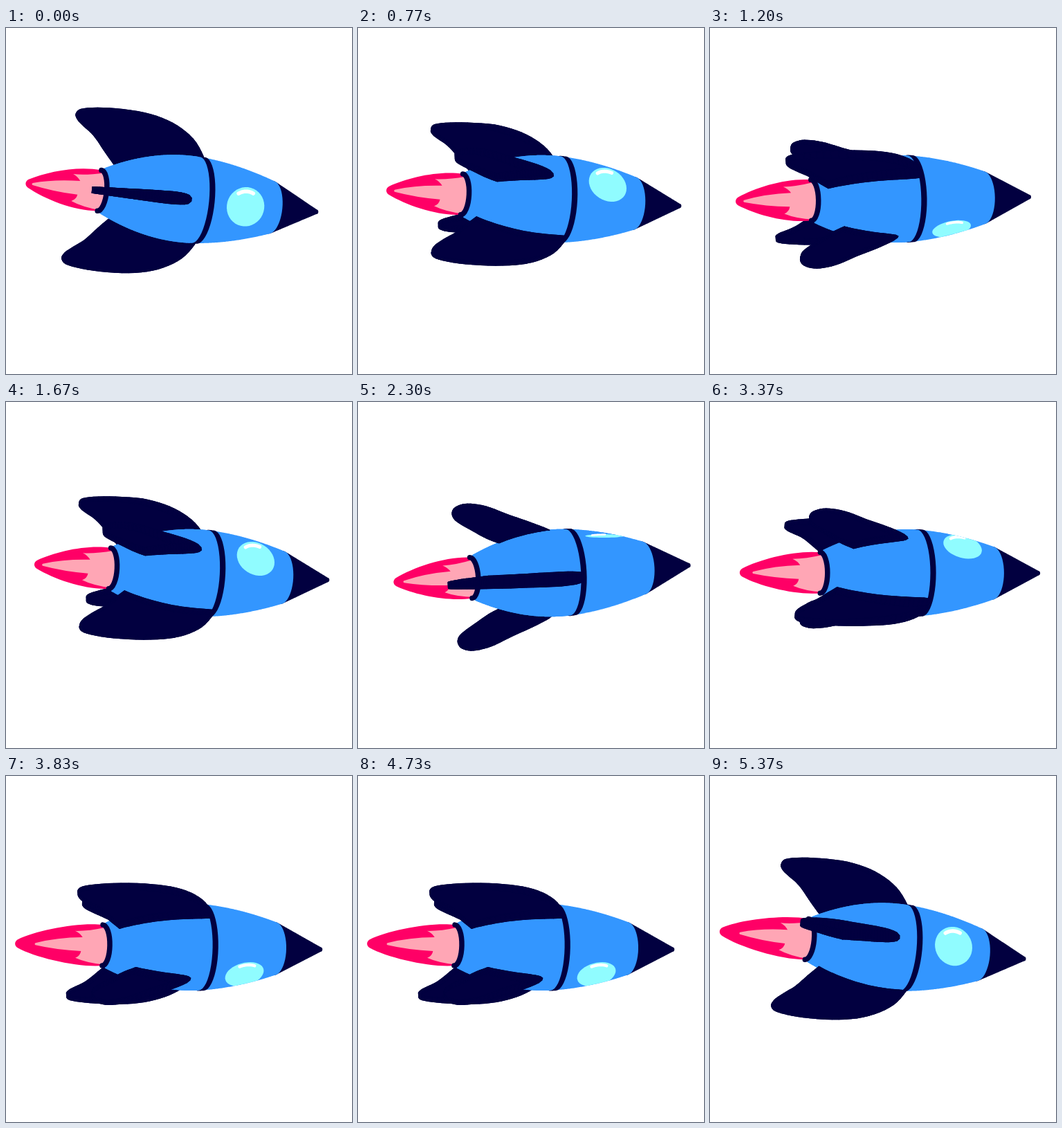
Animation, 500 px wide and 500 px high, one loop 5.41 s. Source, as an HTML page with a canvas:

```html
<!DOCTYPE html>
<html lang="en">
<head>
<meta charset="utf-8">
<title>Rolling rocket</title>
<style>
  html, body { margin: 0; width: 100%; height: 100%; overflow: hidden; background: #fff; }
  canvas { display: block; width: 500px; height: 500px; }
</style>
</head>
<body>
<canvas id="stage" width="500" height="500"></canvas>
<script>
const ctx = document.getElementById('stage').getContext('2d');
const LOOP = 5410, STEP = 100 / 3, CYCLE = 27, HALF_TURN = 28;
const NAVY = '#020040', BLUE = '#3396ff', AQUA = '#90fcff', PINK = '#ff0066', ROSE = '#ffa6b5';
const TAU = Math.PI * 2, RAD = Math.PI / 180;
const YAW = 17 * RAD, SIN = Math.sin(YAW), COS = Math.cos(YAW), FOCUS = 800;
const TAIL = -119, CONE = 136, TIP = 216;
const NOZZLE = { x: -124, rx: 10.5, ry: 29.5 };

// Rocket space (x along the axis, y down, z to the viewer) to the tilted screen frame.
function project(x, y, z) {
  const k = FOCUS / (FOCUS - (z * COS - x * SIN));
  return [(x * COS + z * SIN) * k, y * k];
}

function hull(x) {
  if (x > CONE) return 40.2 - (x - CONE) * 0.46;
  const d = x - 5;
  return d > 0 ? 63 - 0.00388 * d ** 1.78 : 63 - 0.00201 * d * d;
}

function addPoly(path, pts) {
  pts.forEach((p, i) => i ? path.lineTo(p[0], p[1]) : path.moveTo(p[0], p[1]));
  path.closePath();
}

// Union of cross-section discs between two places on the axis.
function tube(from, to, grow = 0) {
  const path = new Path2D(), n = Math.ceil((to - from) / 1.5);
  for (let i = 0; i <= n; i++) {
    const x = from + (to - from) * i / n, r = hull(x) + grow, pts = [];
    for (let j = 0; j < 48; j++) {
      const a = TAU * j / 48;
      pts.push(project(x, r * Math.sin(a), r * Math.cos(a)));
    }
    addPoly(path, pts);
  }
  return path;
}

const cone = tube(CONE, TIP);
const shell = tube(TAIL, CONE);
const ring = tube(15, 23, 0.7);
const rear = tube(TAIL, 15);
const outline = tube(TAIL, TIP);

// Outer edges of the fins as (x, radius), from the front root to the back root.
const LONG_EDGE = [[22, 61.5], [1, 86], [-32, 103.8], [-73, 112], [-122, 111.6], [-156, 106.4],
  [-165, 99.5], [-162, 91.5], [-153, 84], [-137, 72], [-120, 53], [-106, 38]];
const SHORT_EDGE = [[-10, 62], [-40, 74], [-70, 85], [-100, 97], [-125, 101], [-140, 97],
  [-145, 90], [-143, 82], [-135, 75], [-117, 64], [-100, 54], [-84, 47]];

function spline(pts, n) {
  const at = i => pts[Math.max(0, Math.min(pts.length - 1, i))], out = [];
  for (let i = 0; i < pts.length - 1; i++) {
    for (let j = 0; j < n; j++) {
      const t = j / n;
      out.push([0, 1].map(c => {
        const [a, b, d, e] = [at(i - 1)[c], at(i)[c], at(i + 1)[c], at(i + 2)[c]];
        return b + t / 2 * (d - a + t * (2 * a - 5 * b + 4 * d - e + t * (3 * (b - d) + e - a)));
      }));
    }
  }
  out.push(pts[pts.length - 1]);
  return out;
}

function makeFin(edge) {
  const pts = spline(edge, 5), front = edge[0][0], end = edge[edge.length - 1][0];
  for (let i = 1; i < 20; i++) {
    const x = end + (front - end) * i / 20;
    pts.push([x, hull(x)]);
  }
  const back = Math.min(...pts.map(p => p[0]));
  return pts.map(([x, r]) => {
    const u = Math.min(1, (x - back) / (front - back));
    return { x, r, half: 2 + (1.5 + 6 * u) * Math.sqrt(1 - u ** 8), out: Math.max(0, r - hull(x)) / 60 };
  });
}

const LONG = makeFin(LONG_EDGE), SHORT = makeFin(SHORT_EDGE);

function drawFin(fin, a, bend) {
  const c = Math.cos(a), s = Math.sin(a);
  const side = m => fin.map(({ x, r, half, out }) =>
    project(x, r * s + m * half * c + bend * Math.min(1, out), r * c - m * half * s));
  const p = side(1), q = side(-1), n = fin.length;
  ctx.fillStyle = ctx.strokeStyle = NAVY;
  ctx.lineWidth = 1.5;
  const fill = pts => {
    const path = new Path2D();
    addPoly(path, pts);
    ctx.fill(path);
    ctx.stroke(path);
  };
  fill(p);
  fill(q);
  for (let i = 0; i < n; i++) {
    const j = (i + 1) % n;
    fill([p[i], p[j], q[j], q[i]]);
  }
}

function drawWindow(a) {
  const c = Math.cos(a), s = Math.sin(a);
  if (c <= 0.02) return;
  const arc = (r, from, to) => {
    const pts = [];
    for (let i = 0; i <= 40; i++) {
      const b = from + (to - from) * i / 40, v = r * Math.sin(b);
      pts.push(project(74 + r * 1.03 * Math.cos(b), 51 * s + v * c, 51 * c - v * s));
    }
    return pts;
  };
  ctx.save();
  ctx.clip(outline);
  const disc = new Path2D();
  addPoly(disc, arc(27.5, 0, TAU));
  ctx.fillStyle = AQUA;
  ctx.fill(disc);
  ctx.beginPath();
  arc(21.5, -126 * RAD, -66 * RAD).forEach(p => ctx.lineTo(p[0], p[1]));
  ctx.strokeStyle = '#fff';
  ctx.lineWidth = 2 + 3.5 * c;
  ctx.stroke();
  ctx.restore();
}

function drawFlame(len) {
  const { x, rx, ry } = NOZZLE;
  ctx.fillStyle = PINK;
  ctx.beginPath();
  ctx.moveTo(x, -ry);
  ctx.bezierCurveTo(-158, -33, -len + 30, -20, -len + 4, -6);
  ctx.bezierCurveTo(-len - 1, -3, -len - 1, 3, -len + 4, 6);
  ctx.bezierCurveTo(-len + 30, 20, -158, 33, x, ry);
  ctx.ellipse(x, 0, rx, ry, 0, Math.PI / 2, -Math.PI / 2, true);
  ctx.fill();

  ctx.fillStyle = ROSE;
  ctx.beginPath();
  ctx.moveTo(-221, -1.5);
  ctx.quadraticCurveTo(-190, -10, -153, -11);
  ctx.quadraticCurveTo(-157, -17, -164, -20);
  ctx.quadraticCurveTo(-145, -20, x + 4, -26);
  ctx.ellipse(x, 0, rx, ry, 0, -62 * RAD, 72 * RAD);
  ctx.quadraticCurveTo(-147, 26, -163, 19);
  ctx.quadraticCurveTo(-156, 16, -155, 9);
  ctx.quadraticCurveTo(-190, 8, -221, 1.5);
  ctx.quadraticCurveTo(-223, 0, -221, -1.5);
  ctx.fill();

  ctx.strokeStyle = NAVY;
  ctx.lineWidth = 7.5;
  ctx.beginPath();
  ctx.ellipse(x, 0, rx, ry, 0, -Math.PI / 2, Math.PI / 2);
  ctx.stroke();
}

function paint(path, color) {
  ctx.fillStyle = color;
  ctx.fill(path);
}

function draw(time) {
  const last = Math.round(LOOP / STEP) - 1;
  const frame = Math.min(last, Math.floor((time % LOOP + 5) / STEP)) % CYCLE;
  const turn = TAU * frame / HALF_TURN, roll = turn / 2;
  const sway = 272 - 16 * Math.cos(turn - TAU * 2.5 / HALF_TURN);
  const tilt = (1.1 + 4.5 * Math.cos(turn)) * RAD;
  const flame = 241 - 10 * Math.cos(turn * 6 - 15 * RAD);
  const bend = 7 * Math.sin(turn) - 2;

  ctx.setTransform(1, 0, 0, 1, 0, 0);
  ctx.fillStyle = '#fff';
  ctx.fillRect(0, 0, 500, 500);
  ctx.translate(sway, 247);
  ctx.rotate(tilt);
  ctx.lineCap = ctx.lineJoin = 'round';

  const fins = [0, 1, 2, 3].map(i => ({ long: i % 2, a: roll + i * Math.PI / 2 }));
  const near = f => Math.cos(f.a) > 0.001;
  const drawFins = list => list.forEach(f => drawFin(f.long ? LONG : SHORT, f.a, f.long ? bend : 0));
  drawFins(fins.filter(f => !near(f)));

  paint(cone, NAVY);
  const [nx, ny] = project(TIP - 1, 0, 0);
  ctx.beginPath();
  ctx.arc(nx, ny, 3.2, 0, TAU);
  ctx.fill();
  paint(shell, BLUE);
  paint(ring, NAVY);
  paint(rear, BLUE);
  drawFlame(flame);

  const port = roll + 3 * RAD;
  drawWindow(port);
  drawWindow(port + Math.PI);
  drawFins(fins.filter(near));
}

const start = performance.now();
function tick() {
  draw(performance.now() - start);
  requestAnimationFrame(tick);
}
tick();
</script>
</body>
</html>
```
